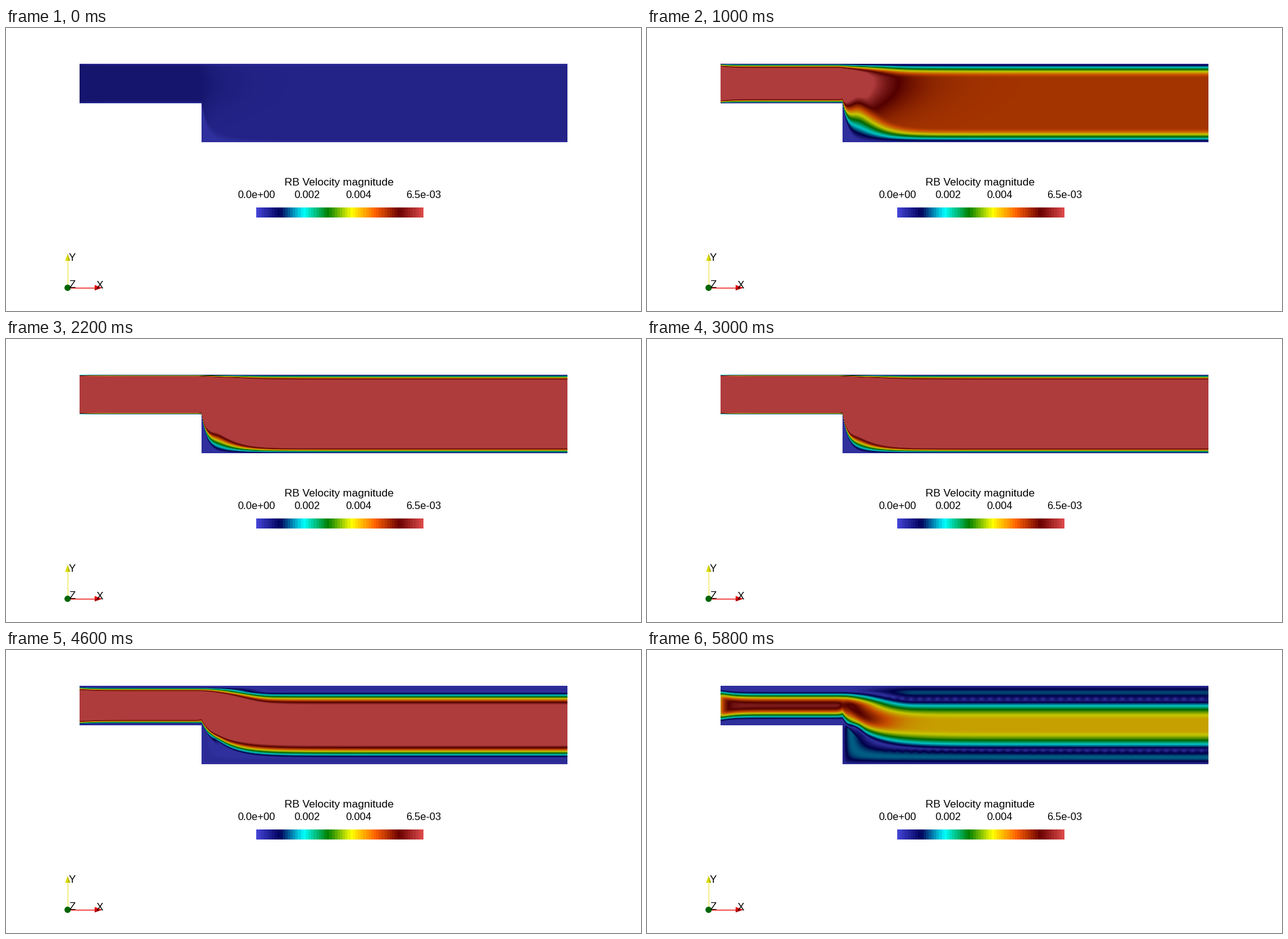
A matplotlib script for the animation above (6 s loop, 1010 by 451 pixels).

```python
import numpy as np
import matplotlib.pyplot as plt
from matplotlib.animation import FuncAnimation
from matplotlib.colors import LinearSegmentedColormap
from matplotlib.patches import Circle, Polygon

W, H, DPI = 1010, 451, 100
FRAMES, STEP = 30, 200
LEFT, EDGE, RIGHT = 117, 311, 893
TOP, LEDGE, FLOOR = 57, 120, 182
SHADE = 0.78

STOPS = [
    (0.0, (0.278, 0.278, 0.859)), (0.143, (0, 0, 0.361)),
    (0.285, (0, 1, 1)), (0.429, (0, 0.502, 0)),
    (0.571, (1, 1, 0)), (0.714, (1, 0.38, 0)),
    (0.857, (0.42, 0, 0)), (1.0, (0.878, 0.302, 0.302)),
]
cmap = LinearSegmentedColormap.from_list("speed", STOPS, N=512)

x, y = np.meshgrid(np.arange(LEFT, RIGHT) + 0.5, np.arange(TOP, FLOOR) + 0.5)
inside = (x > EDGE) | (y < LEDGE)
past = np.maximum(x - EDGE, 0)


def ease(v, a, b):
    t = np.clip((v - a) / (b - a), 0, 1)
    return t * t * (3 - 2 * t)


def mix(a, b, s):
    return a + (b - a) * s


def rise(d, start, width):
    """Growth from still fluid at distance start up to the core."""
    return np.sin(np.pi / 2 * np.clip((d - start) / width, 0, 1))


def reverse(d, depth):
    """Backflow between the wall and the given depth."""
    return np.sin(np.pi * np.clip(d / max(depth, 1e-6), 0, 1))


top_mix = ease(x, 310, 425)
low_mix = ease(x, 300, 345)
entry = 1 + 0.6 * np.exp(-(x - LEFT) / 12)
gap = FLOOR - y
corner = past * gap / (past + gap)
below = np.clip((y - 115) / 10, 0, 1) * (x > EDGE)
wall = np.minimum(y - TOP, gap)


def speed(k):
    # One pulse of the flow; the core keeps some speed at its end.
    pulse = 2.15 * np.sin(np.pi * k / FRAMES) ** 1.6
    lag = ease(k, 21, 30)
    u_in = 0.087 + 2 * pulse + 0.75 * lag
    u_out = 0.047 + pulse + 0.53 * lag

    # Wall layers thicken, then lift off the wall as the flow turns back.
    young, old = ease(k, 0, 5), ease(k, 11, 22)
    w_in = 4 + 11 * young + 9 * old
    w_out = 4 + 19 * young + 11 * old
    lift_in = 9 * ease(k, 21, 27)
    lift_out = 21.5 * ease(k, 17.5, 29)
    back = 0.19 * ease(k, 22, 26.5)

    # Lower edge of the jet drops from the ledge to the floor.
    reach = 9 + 27 * ease(k, 14, 27)
    edge = LEDGE + (FLOOR - LEDGE) * (1 - np.exp(-past / reach))
    spread = 3.3 * (1 - old)
    d_low = (edge - y) / (1 + spread * past / 18 * np.exp(1 - past / 18))
    d_top = y - TOP
    low = mix(rise(d_low * entry, lift_in, w_in),
              rise(d_low, lift_out, w_out), low_mix)
    high = mix(rise(d_top * entry, lift_in, w_in),
               rise(d_top, lift_out, w_out), top_mix)

    # Core speed falls past the step, with a rounded nose.
    late = ease(k, 12, 24)
    off = y - (86 + 14 * ease(k, 17, 27))
    nose = np.where(off > 0, 0.02, 0.03) * off ** 2
    ahead = x + nose * np.clip((x - 295) / 40, 0, 1) - 310
    s = 1 - np.exp(-(np.maximum(ahead, 0) / (45 + 25 * late)) ** (1 + late))
    start = 1 - 0.33 * ease(k, 19, 24) * np.exp(-(x - LEFT) / 9)
    u = mix(u_in * start, u_out, s) * high * low

    u -= back * top_mix * reverse(d_top, lift_out)
    u -= 1.1 * back * below * reverse(corner, lift_out)
    cells = (0.09 * ease(k, 22, 27) * top_mix * np.abs(np.sin(np.pi * x / 14))
             * np.exp(-((wall - 20.5) / 4) ** 2))
    return np.sqrt(u ** 2 + cells ** 2 + 0.02 ** 2)


def picture(k):
    rgba = cmap(np.clip(speed(k), 0, 1))
    rgba[..., :3] *= SHADE
    rgba[..., 3] = inside
    return rgba


fig = plt.figure(figsize=(W / DPI, H / DPI), dpi=DPI, facecolor="white")
ax = fig.add_axes([0, 0, 1, 1])
ax.axis("off")


def label(px, py, text, size):
    ax.text(px, py, text, fontsize=size * 72 / DPI, family="Liberation Sans",
            color="black", ha="center", va="baseline", zorder=5)


def shape(points, color):
    ax.add_patch(Polygon(points, fc=color, lw=0, zorder=3))


field = ax.imshow(picture(0), extent=(LEFT, RIGHT, FLOOR, TOP),
                  interpolation="nearest", aspect="auto")

# Colour scale
bar = cmap((np.arange(64) + 0.5) / 64)[None]
ax.imshow(bar, extent=(398, 664, 302, 286), interpolation="nearest", aspect="auto")
label(530, 251, "RB Velocity magnitude", 17.2)
for px, text in ((398, "0.0e+00"), (478.5, "0.002"), (560.5, "0.004"), (664, "6.5e-03")):
    label(px, 271, text, 16.5)

# Axis marker
ax.plot([97.5, 97.5], [410, 371], color="#f0e640", lw=0.8)
ax.plot([100, 142], [414, 414], color="#f01414", lw=1)
shape([(98, 360), (94, 371), (102, 371)], "#dcdc00")
shape([(98, 360), (99.5, 371), (102, 371)], "#a8a800")
shape([(153, 414), (141, 409.5), (141, 418)], "#e00000")
shape([(153, 414), (141, 415.5), (141, 418)], "#a00000")
ax.add_patch(Circle((98, 414), 5, fc="#006400", lw=0, zorder=3))
for px, py, text in ((105, 371, "Y"), (105.5, 414, "Z"), (149, 415, "X")):
    label(px, py, text, 16.5)

ax.set_xlim(0, W)
ax.set_ylim(H, 0)


def draw(k):
    field.set_data(picture(k))
    return [field]


anim = FuncAnimation(fig, draw, frames=FRAMES, interval=STEP,
                     repeat=True, repeat_delay=0)
plt.show()
```
